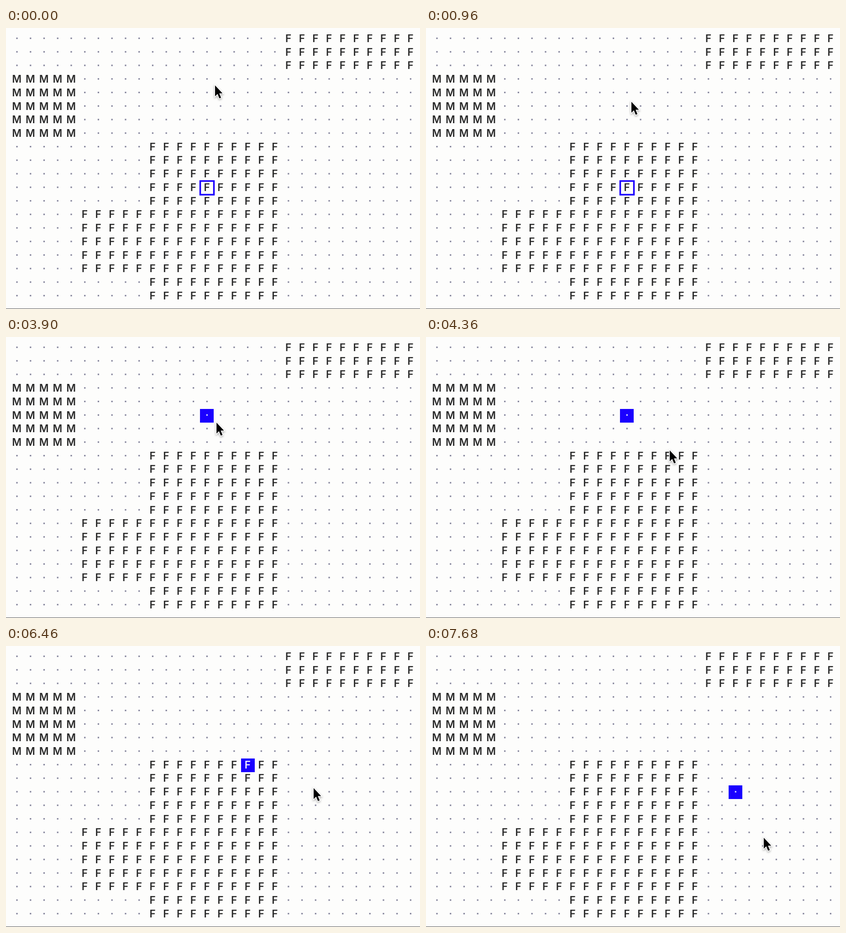
An HTML page with a canvas for the animation above (8 s loop, 907 by 617 pixels).

```html
<!DOCTYPE html>
<html>
<head>
<meta charset="utf-8">
<style>
html, body { margin: 0; width: 907px; height: 617px; overflow: hidden; background: #fdfdfc; }
canvas { display: block; }
</style>
</head>
<body>
<canvas id="stage" width="907" height="617"></canvas>
<script>
const ctx = document.getElementById('stage').getContext('2d');
const LOOP = 8000, PITCH = 29.74, EDGE = 9, CELL = 30;
const BLUE = '#1a00ff';
const arrow = new Path2D('M0 0V24L5.4 18.8L9.4 28.6L13.2 27L9.2 17.4H16.4Z');

// The pointer rests at each stop, then leaves for the next one.
const stops = [
  { x: 458, y: 126, leave: 20, arrive: 600 },
  { x: 450, y: 162, leave: 3640, arrive: 4360, click: 1200 },
  { x: 534, y: 249, leave: 5760, arrive: 6280, click: 4620 },
  { x: 674, y: 312, leave: 7120, arrive: 7680, click: 6600 },
  { x: 740, y: 421 }
];

const cellOf = v => Math.floor((v - EDGE) / PITCH);
const mix = (a, b, k) => a + (b - a) * k;

function letterAt(c, r) {
  if (c < 5 && r >= 3 && r < 8) return 'M';
  const top = c >= 20 && r < 3;
  const block = c >= 10 && c < 20 && r >= 8;
  const wing = c >= 5 && c < 10 && r >= 13 && r < 18;
  return top || block || wing ? 'F' : '';
}

function drawCell(c, r, ink, dot) {
  const x = 24 + c * PITCH, y = 22.6 + r * PITCH;
  const letter = letterAt(c, r);
  if (letter) {
    ctx.fillStyle = ink;
    ctx.fillText(letter, x - 0.3, y + 8.2);
  } else {
    ctx.fillStyle = dot;
    ctx.fillRect(x - 1.6, y - 1.6, 3.2, 3.2);
  }
}

function drawPick(t) {
  const stop = stops.filter(s => t >= s.click).pop();
  const c = stop ? cellOf(stop.x) : 14, r = stop ? cellOf(stop.y) : 11;
  const x = Math.round(EDGE + c * PITCH), y = Math.round(EDGE + r * PITCH);
  if (stop) {
    ctx.fillStyle = BLUE;
    ctx.fillRect(x, y, CELL, CELL);
    drawCell(c, r, '#f4f2ff', '#d8d4ff');
  } else {
    ctx.strokeStyle = BLUE;
    ctx.lineWidth = 3.5;
    ctx.strokeRect(x + 0.5, y, CELL, CELL);
  }
}

// Eased travel; the sideways part lags a little, which bends the path.
function pointerAt(t) {
  const i = Math.max(0, stops.filter(s => t >= s.leave).length - 1);
  const a = stops[i], b = stops[i + 1];
  const k = Math.min(1, Math.max(0, (t - a.leave) / (a.arrive - a.leave)));
  const e = k * k * (3 - 2 * k);
  return [mix(a.x, b.x, e ** 1.67), mix(a.y, b.y, e)];
}

function drawPointer(t) {
  ctx.save();
  ctx.translate(...pointerAt(t));
  ctx.shadowColor = 'rgba(0,0,0,.35)';
  ctx.shadowBlur = 4;
  ctx.shadowOffsetY = 2;
  ctx.strokeStyle = '#fff';
  ctx.lineWidth = 3;
  ctx.stroke(arrow);
  ctx.shadowColor = 'transparent';
  ctx.fillStyle = '#000';
  ctx.fill(arrow);
  ctx.restore();
}

function draw(t) {
  ctx.fillStyle = '#fdfdfc';
  ctx.fillRect(0, 0, 907, 617);
  ctx.font = '600 22.5px Inter, "Liberation Sans", sans-serif';
  ctx.textAlign = 'center';
  for (let r = 0; r < 20; r++)
    for (let c = 0; c < 30; c++) drawCell(c, r, '#2a2a2a', '#85859c');
  ctx.fillStyle = '#505050';
  ctx.fillRect(0, 616, 907, 1);
  drawPick(t);
  drawPointer(t);
}

function tick() {
  draw(performance.now() % LOOP);
  requestAnimationFrame(tick);
}
tick();
</script>
</body>
</html>
```
